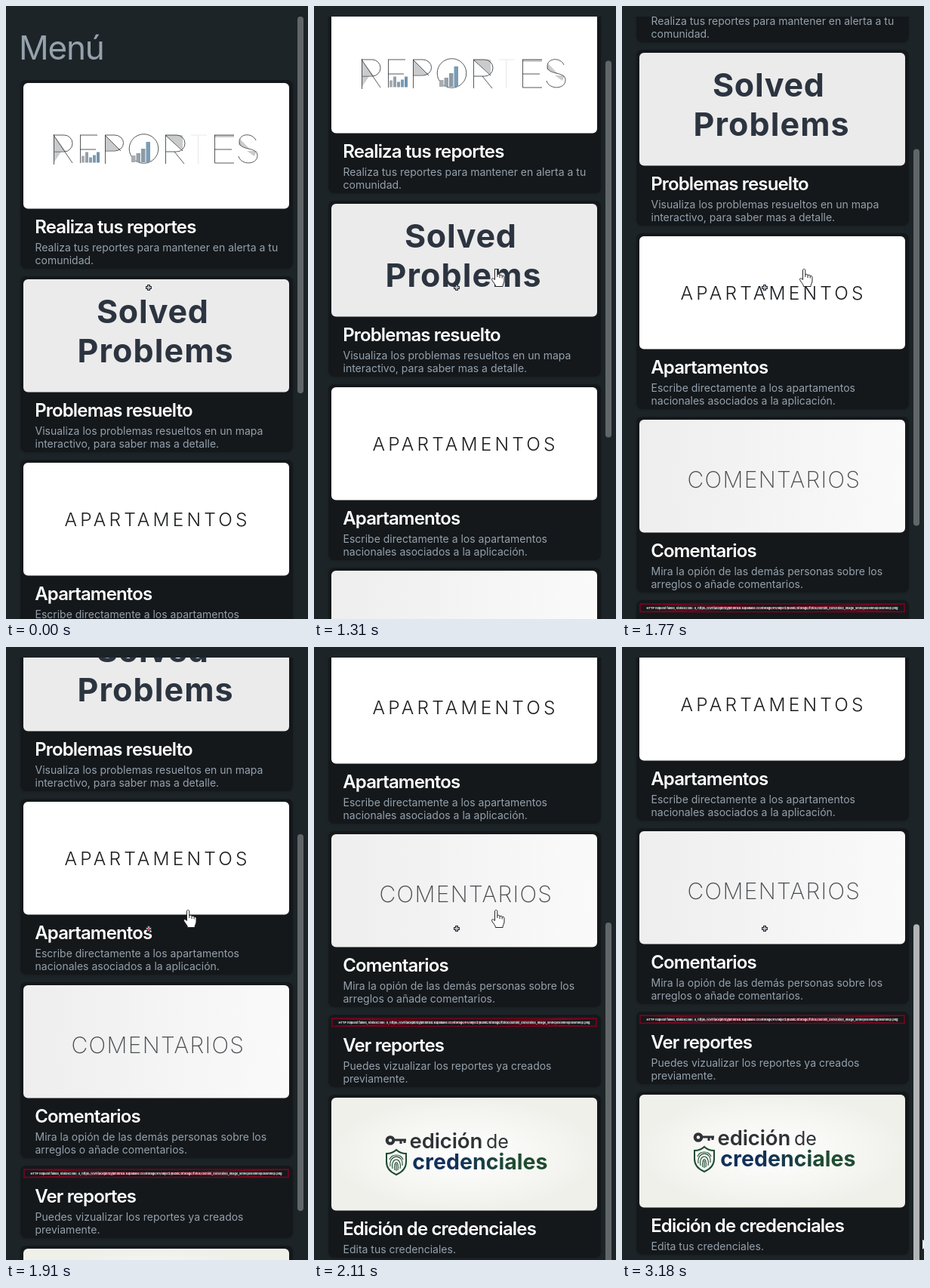
Recreate the animation shown at these times as an HTML page. Size 400 px wide and 812 px high, loop 3.64 s.

```html
<!DOCTYPE html>
<html lang="es">
<head>
<meta charset="utf-8">
<title>Menú</title>
<style>
  html, body { margin: 0; width: 100%; height: 100%; overflow: hidden; background: #1d2428; }
  body { position: relative; font-family: Inter, sans-serif; color: #95a1ac; }
  #view { position: absolute; inset: 14px 0 0; overflow: hidden; }
  #page { position: absolute; top: -14px; left: 0; width: 400px; }
  h1 { position: absolute; left: 17px; top: 29px; margin: 0; font: 400 44px/53px Inter, sans-serif; letter-spacing: -1.2px; }
  .card { position: absolute; left: 19px; width: 361px; border-radius: 8px; background: #14181b; box-shadow: 0 1px 3px #0003; }
  .card svg { position: absolute; left: 4px; top: 4px; overflow: visible; }
  h2 { position: absolute; left: 19.2px; margin: 0; font: 600 24px/29px Inter, sans-serif; letter-spacing: -.85px; color: #fff; white-space: nowrap; }
  p { position: absolute; left: 19.5px; margin: 0; font-size: 14px; line-height: 17px; white-space: pre; }
  #thumb { position: absolute; left: 386px; top: 14px; width: 8px; height: 499px; border-radius: 4px; }
  #over { position: absolute; left: 0; top: 0; }
</style>
</head>
<body>
<div id="view"><div id="page"><h1>Menú</h1></div></div>
<div id="thumb"></div>
<svg id="over" width="400" height="812">
  <g fill="none">
    <path d="M189 369v8M185 373h8" stroke="#2b323a" stroke-width="4"/>
    <path d="M189 370v6M186 373h6" stroke="#d0d4d6" stroke-width="1.400"/>
    <circle id="dot" cx="189" cy="373.500" r="1.300" fill="#d8324a"/>
  </g>
  <path id="arrow" d="M.5 .5V16L4 12.700L6.500 18.500L9 17.400L6.600 11.800H11.500Z" fill="#fff" stroke="#111"/>
  <path id="hand" d="M-1.500 2C-1.500 0 1.800 0 1.800 2V8C2.500 6.800 5 7 5 8.800C6 7.700 8 8.200 8.200 9.800C9.300 9 11 9.500 11 11.500V16C11 19 9 20 9 23.500H-.5C-.8 20.500-3 19-5 15.500C-6.500 13-4.500 11.500-1.500 14.500ZM1.800 8v3M5 9v3M8.200 10v2.500" fill="#fff" stroke="#222"/>
</svg>
<script>
const $ = id => document.getElementById(id);
const label = (s, x, y, size, weight, fill, gap = 0, anchor = 'start') =>
  `<text x="${x}" y="${y}" font-size="${size}" font-weight="${weight}" fill="${fill}" letter-spacing="${gap}" text-anchor="${anchor}">${s}</text>`;
const fill = c => `<rect width="352" height="100%" rx="6" fill="${c}"/>`;
const path = (d, stroke, width = 1, extra = 'fill="none"') =>
  `<path d="${d}" stroke="${stroke}" stroke-width="${width}" ${extra}/>`;
const bars = (x, base, w, heights) => heights.map((h, i) =>
  `<rect x="${x + i * (w + 1)}" y="${base - h}" width="${w}" height="${h}" fill="${['#a9adb0', '#94a1ab', '#8b9ba7', '#7b9cb3', '#6f95b0'][i]}"/>`).join('');

const reports = fill('#fff') +
  path('M40 69V90H56ZM40 91V106L50 91ZM108 69L128 89H108ZM188 69H211V89ZM253 69H279V72H253ZM287 74L300 88L285 82ZM296 90H309L306 97Z', 'none', 0, 'fill="#c9cbcc"') +
  path('M222 69H243M231.500 69V107', '#e6e8e9') +
  path(`M40.500 68V108M40 69H54a11 11 0 0 1 0 22H41M40 69L65 106
    M75.500 69V106M75 69H98M75 88H96
    M108.500 69V107M108 69H121a11 10 0 0 1 0 21H108M108 69L129 90
    M188.500 69V107M188 69H203a11 11 0 0 1 0 22H189M200 91L213 107M188 69L211 90
    M253.500 69V106H279M253 69H279M253 88H276
    M308 76C304 66 286 66 286 78C286 90 310 84 310 96C310 109 288 109 285 97`, '#2c2f32', .8) +
  '<circle cx="159.500" cy="87" r="19.300" fill="none" stroke="#2c2f32" stroke-width=".8"/>' +
  bars(77, 105.500, 4, [9, 14, 7, 10, 14]) + bars(143, 105, 5.500, [9, 12, 18, 27]);

const solved = fill('#ebebeb') + label('Solved', 97, 58, 43, 700, '#2c3440', .7) +
  label('Problems', 71.500, 110, 43, 700, '#2c3440', 1.100);

const flats = fill('#fff') + label('APARTAMENTOS', 54.500, 84, 24.500, 300, '#1c1e20', 4.150);

const comments = '<linearGradient id="g1"><stop stop-color="#eee"/><stop offset="1" stop-color="#fafafa"/></linearGradient>' +
  fill('url(#g1)') + label('COMENTARIOS', 63.500, 89.500, 30, 200, '#4a4d50', 1.300);

const failed = path('M1 1H351V11.500H1ZL351 11.500M1 11.500L351 1', '#8d021fcf', 1.600) +
  label('HTTP request failed, statusCode: 0, https://ovritaoxpnrdypmmhsd.supabase.co/storage/v1/object/public/Storage/fotos/Gemini_Generated_Image_5mnepos5mnepos5mnep.png',
    176, 7.800, 3.850, 700, '#fff', 0, 'middle');

const login = `<radialGradient id="g2"><stop stop-color="#fff"/><stop offset="1" stop-color="#f0f0eb"/></radialGradient>
  <linearGradient id="g3"><stop offset=".3" stop-color="#12305a"/><stop offset=".75" stop-color="#1f4c30"/></linearGradient>` +
  fill('url(#g2)') +
  '<circle cx="78" cy="56.500" r="4.300" fill="none" stroke="#2e3236" stroke-width="4"/>' +
  path('M83 56H99M92 56v5M97 56v4', '#2e3236', 3) +
  path('M86 69C82 73 77 74 73 74V85C73 94 79 99 86 102C93 99 99 94 99 85V74C95 74 90 73 86 69Z', '#1f4c30', 2) +
  path('M78 91C76 74 96 74 94 90M81 94C78 78 94 78 91 94M84 96C82 82 90 82 88 96M86 87V97M77 82C80 74 92 74 95 82', '#1f4c30', 1.100) +
  label('edición', 103.500, 66.700, 27.500, 600, '#303336', -.1) +
  label('de', 205, 66.700, 25, 400, '#303336') +
  label('credenciales', 107.300, 95, 28.500, 700, 'url(#g3)');

// image top, image height, title, text, art
const cards = [
  [102, 166.500, 'Realiza tus reportes', 'Realiza tus reportes para mantener en alerta a tu\ncomunidad.', reports],
  [362, 149.500, 'Problemas resuelto', 'Visualiza los problemas resueltos en un mapa\ninteractivo, para saber mas a detalle.', solved],
  [605, 149.500, 'Apartamentos', 'Escribe directamente a los apartamentos\nnacionales asociados a la aplicación.', flats],
  [848, 149.500, 'Comentarios', 'Mira la opión de las demás personas sobre los\narreglos o añade comentarios.', comments],
  [1091, 12.500, 'Ver reportes', 'Puedes vizualizar los reportes ya creados\npreviamente.', failed],
  [1197, 149.500, 'Edición de credenciales', 'Edita tus credenciales.', login]
].map(([top, h, title, text, art]) => {
  const box = { top: top - 4, height: h + (text.includes('\n') ? 83.5 : 66.5) };
  $('page').insertAdjacentHTML('beforeend',
    `<div class="card" style="top:${box.top}px;height:${box.height}px">
      <svg width="352" height="${h}">${art}</svg>
      <h2 style="top:${h + 13.5}px">${title}</h2><p style="top:${h + 46.5}px">${text}</p></div>`);
  return box;
});

const LOOP = 3640;
const scrolls = [[0, 0], [1310, 100], [1380, 200], [1770, 300], [1910, 400], [1980, 500], [2110, 600], [2430, 604]];
const leaveStep = t => t < 2760 ? 0 : Math.min(7, Math.floor((t - 2760) / 70) + 1);

function pointer(t) {
  if (t < 130) return null;
  if (t < 190) return [397, 775];
  if (t < 650) return null;
  const left = 1 - Math.min(3, Math.floor((t - 650) / 66.6)) / 3;
  if (left) return [241 + 99 * left, 348 + 60 * left];
  const p = 1 - (1 - leaveStep(t) / 7) ** 2;
  return [241 + 156 * p, 348 + 435 * p];
}

function draw(now) {
  const t = now % LOOP;
  const scroll = scrolls.findLast(([at]) => t >= at)[1];
  $('page').style.transform = `translateY(${-scroll}px)`;
  $('thumb').style.transform = `translateY(${scroll * .585}px)`;
  $('thumb').style.background = `rgba(255,255,255,${.3 + .12 * Math.max(0, leaveStep(t) - 4)})`;
  $('dot').style.display = scroll === 400 ? '' : 'none';

  const at = pointer(t);
  const y = at && at[1] + scroll + 1;
  const over = at && at[0] < 380 && cards.some(c => y > c.top && y < c.top + c.height);
  for (const [id, on] of [['arrow', at && !over], ['hand', over]]) {
    $(id).style.display = on ? '' : 'none';
    if (on) $(id).setAttribute('transform', `translate(${at})`);
  }
  requestAnimationFrame(draw);
}
requestAnimationFrame(draw);
</script>
</body>
</html>
```
